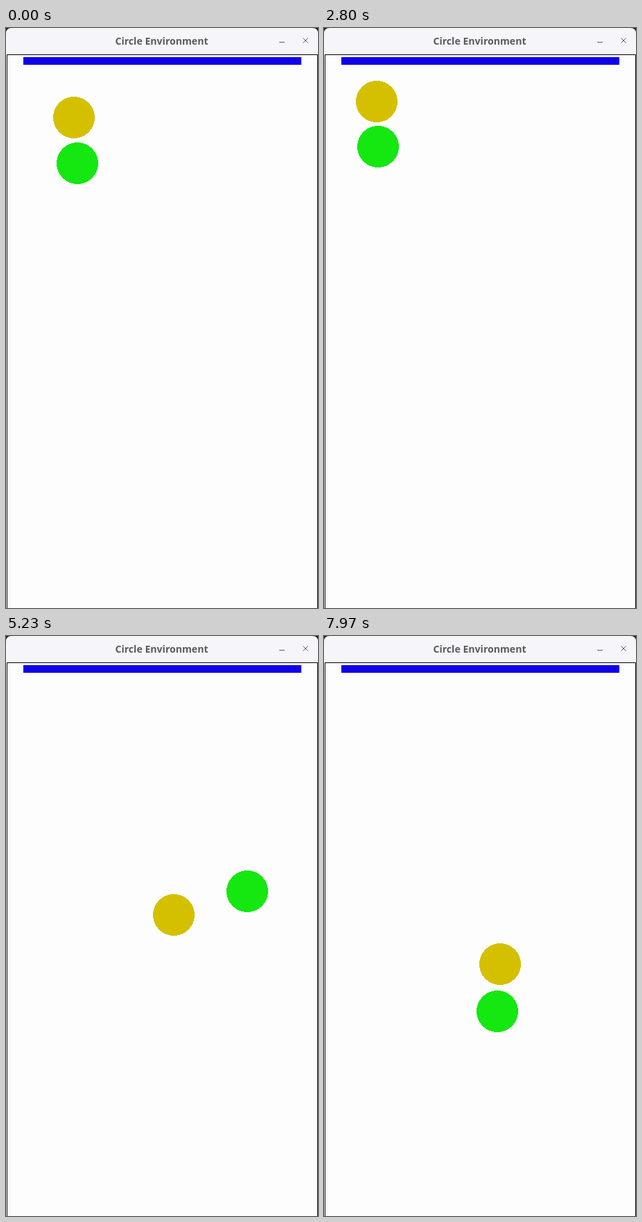
An HTML page that plays this animation: 450x836 px, repeating every 8 s.

```html
<!DOCTYPE html>
<html lang="en">
<head>
<meta charset="utf-8">
<title>Circle Environment</title>
<style>
  html, body { margin: 0; width: 100%; height: 100%; overflow: hidden; background: #222; }
  svg { display: block; width: 450px; height: 836px; }
  text { font: 700 14.1px "Open Sans", "Noto Sans", sans-serif; fill: #5a5a5a; }
  circle { shape-rendering: crispEdges; }
</style>
</head>
<body>
<svg viewBox="0 0 450 836">
  <path d="M0 38V8Q0 0 8 0H442Q450 0 450 8V38Z" fill="#f6f6fa"/>
  <text x="224.5" y="24" text-anchor="middle">Circle Environment</text>
  <path d="M394 20.5h8M428.5 14.5l7 7m0-7l-7 7" stroke="#5a5a5a" fill="none"/>
  <rect y="38" width="450" height="798" fill="#fdfdfd"/>
  <path d="M1.5 836V38.5H449.5V836" stroke="#000" fill="none"/>
  <rect x="25" y="42" width="401" height="11" fill="#1000ea"/>
  <circle id="ball" r="30" fill="#d5c000"/>
  <circle id="pusher" r="30" fill="#14e810"/>
</svg>
<script>
const LOOP = 8000;
const TRAIL = [-4, 68]; // where the pusher ends up relative to the ball

// Key points are [step, x, y]. The ball rests until its first one, then rolls straight
// between hits; the pusher appears at its first one and steers in a curve.
const rounds = [
  { ball: [[0, 98, 129], [8, 94, 76]],
    pusher: [[0, 103, 195]] },
  { ball: [[37, 163, 413], [58, 31, 296], [89, 85, 69]],
    pusher: [[9, 350, 555], [31, 251, 458], [58, 78, 341]] },
  { ball: [[93, 300, 262], [112, 295, 137], [123, 331, 77]],
    pusher: [[90, 307, 338], [112, 288, 210]] },
  { ball: [[169, 242, 402], [199, 30, 238], [211, 68, 191], [230, 128, 77]],
    pusher: [[124, 331, 173], [139, 402, 245], [157, 348, 368], [175, 243, 443], [211, 95, 262]] },
  { ball: [[239, 254, 473]],
    pusher: [[231, 259, 595]] }
];

for (const { ball, pusher } of rounds) {
  const [end, x, y] = ball[ball.length - 1];
  pusher.push([end, x + TRAIL[0], y + TRAIL[1]]);
}

// Straight segments, or a Hermite curve through the points when smooth.
function pointAt(path, step, smooth) {
  const last = path.length - 1;
  if (step <= path[0][0]) return path[0].slice(1);
  if (step >= path[last][0]) return path[last].slice(1);
  const i = path.findIndex((p, n) => step < path[n + 1][0]);
  const a = path[i], b = path[i + 1];
  const span = b[0] - a[0], u = (step - a[0]) / span;
  const slope = (n, axis) => {
    const p = path[Math.max(n - 1, 0)], q = path[Math.min(n + 1, last)];
    return (q[axis] - p[axis]) / (q[0] - p[0]);
  };
  return [1, 2].map(axis => {
    const rate = (b[axis] - a[axis]) / span;
    const line = a[axis] + rate * span * u;
    if (!smooth) return line;
    return line + span * u * (1 - u) *
      ((slope(i, axis) - rate) * (1 - u) - (slope(i + 1, axis) - rate) * u);
  });
}

function place(id, [x, y]) {
  const circle = document.getElementById(id);
  circle.setAttribute("cx", Math.round(x));
  circle.setAttribute("cy", Math.round(y));
}

// Three steps per 100 ms, lasting 30, 40 and 30 ms.
function stepAt(ms) {
  const rest = ms % 100;
  return Math.floor(ms / 100) * 3 + (rest >= 30) + (rest >= 70);
}

function draw() {
  const step = stepAt(performance.now() % LOOP);
  const { ball, pusher } = rounds.filter(r => r.pusher[0][0] <= step).pop();
  place("ball", pointAt(ball, step, false));
  place("pusher", pointAt(pusher, step, true));
  requestAnimationFrame(draw);
}
draw();
</script>
</body>
</html>
```
